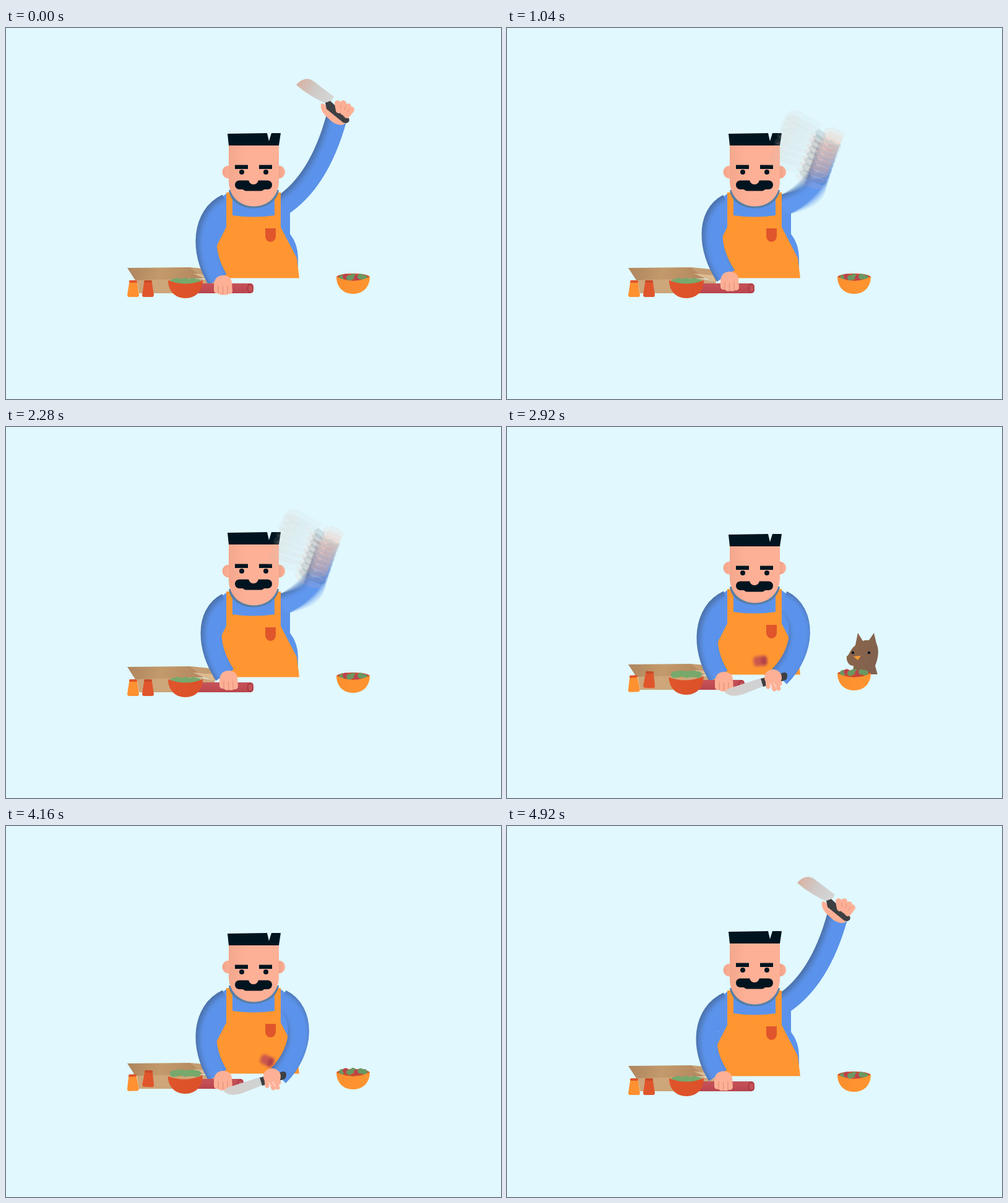
These frames come from a looping animation (800x600 px, 4960 ms). An HTML page with a canvas:

```html
<!DOCTYPE html>
<html lang="en">
<head>
<meta charset="utf-8">
<title>Busy cook</title>
<style>
html, body { margin: 0; width: 100%; height: 100%; overflow: hidden; background: #e0f8fe; }
canvas { display: block; width: 800px; height: 600px; }
</style>
</head>
<body>
<canvas id="stage" width="800" height="600"></canvas>
<script>
const LOOP = 4960, CHOP = 1240, STEP = 40, HIT = 360;
const INK = '#00141f', SKIN = '#fdb096', SKIN_DARK = '#df927a', BLUE = '#5b93ec', NAVY = '#4b70a8';
const ORANGE = '#ff9631', RED = '#e0552b', GREEN = '#77a96c', MEAT = '#c14c54';

const makeCanvas = () => Object.assign(document.createElement('canvas'), { width: 800, height: 600 });
const stage = document.getElementById('stage').getContext('2d');
const sample = makeCanvas().getContext('2d');
const blend = makeCanvas().getContext('2d');
let c = stage;

const clamp = x => Math.min(1, Math.max(0, x));
const lerp = (a, b, k) => a + (b - a) * k;
const ease = x => x * x * (3 - 2 * x);
const span = (t, a, b) => clamp((t - a) / (b - a));
const hop = (p, start, length, height) => {
  const k = span(p, start, start + length);
  return -4 * height * k * (1 - k);
};
function keyed(t, ...keys) {
  for (let i = 1; i < keys.length; i++) {
    const [a, va] = keys[i - 1], [b, vb] = keys[i];
    if (t <= b) return lerp(va, vb, span(t, a, b));
  }
  return keys[keys.length - 1][1];
}

function fill(color, path) {
  c.fillStyle = color;
  c.fill(typeof path === 'string' ? new Path2D(path) : path);
}
function oval(color, x, y, rx, ry = rx, turn = 0) {
  c.fillStyle = color;
  c.beginPath();
  c.ellipse(x, y, rx, ry, turn, 0, 7);
  c.fill();
}
function line(color, width, path, cap = 'round') {
  c.strokeStyle = color;
  c.lineWidth = width;
  c.lineCap = cap;
  c.stroke(new Path2D(path));
}
function block(color, x, y, w, h, r = 0) {
  c.fillStyle = color;
  c.beginPath();
  c.roundRect(x, y, w, h, r);
  c.fill();
}
function fade(x0, y0, x1, y1, ...colors) {
  const g = c.createLinearGradient(x0, y0, x1, y1);
  colors.forEach((color, i) => g.addColorStop(i / (colors.length - 1), color));
  return g;
}
function moved(dx, dy, draw) {
  c.save();
  c.translate(dx, dy);
  draw();
  c.restore();
}
function turned(x, y, px, py, angle, draw) {
  c.save();
  c.translate(x, y);
  c.rotate(angle);
  c.translate(-px, -py);
  draw();
  c.restore();
}
function clear(ctx) {
  ctx.setTransform(1, 0, 0, 1, 0, 0);
  ctx.clearRect(0, 0, 800, 600);
}

// Draws on a separate layer, averaging several poses when there is motion.
function layered(poses, dy, draw) {
  clear(blend);
  blend.globalCompositeOperation = 'lighter';
  blend.globalAlpha = 1 / poses.length;
  for (const pose of poses) {
    clear(sample);
    c = sample;
    draw(pose);
    blend.drawImage(sample.canvas, 0, 0);
  }
  c = stage;
  c.drawImage(blend.canvas, 0, dy);
}

// 1 with the knife held high, 0 with the blade on the board
function raise(p) {
  p = (p + CHOP) % CHOP;
  if (p < HIT) return 1 - span(p, 100, HIT) ** 2;
  return ease(span(p, 900, 1110));
}

function arm(path, light) {
  line(NAVY, 34, path, 'butt');
  c.save();
  c.globalCompositeOperation = 'source-atop';
  c.filter = 'blur(4px)';
  c.translate(light, 4);
  line(BLUE, 34, path);
  c.restore();
}
function rightArm(u) {
  const x = (a, b) => lerp(a, b, u);
  arm(`M445 ${x(285, 288)}C${x(482, 485)} ${x(303, 262)} ${x(484, 515)} ${x(364, 215)} ${x(440, 534)} ${x(408, 146)}`, 1 + 4 * u);
}

function raisedHand() {
  fill(SKIN, 'M509 123Q512 120 518 127L532 137 550 147Q550 157 541 157 530 156 522 147 507 135 509 123Z');
  fill(fade(470, 88, 526, 118, '#d9b0a0', '#cfcac8', '#d4d6d6'),
    'M469 92Q476 83 487 82 493 83 497 86L530 111 522 124 Q492 112 469 92Z');
  fill('#3d3f42', 'M516 121L524 118 554 146Q557 151 550 154L545 153 518 131Z');
  line(SKIN, 10, 'M536 122L538 133M545 122L545 136M553 127L549 139M558 132L551 141');
  line(SKIN_DARK, 1, 'M541 124L541 131M549 126L547 133M555 131L552 136');
}
function loweredHand() {
  fill(fade(357, 428, 414, 410, '#d5cfcc', '#cfd3d4'),
    'M358 423L411 406 415 419 382 432Q366 437 358 433 352 430 352 428Z');
  fill('#3d3f42', 'M410 407L448 397Q453 397 453 402 453 409 448 410L414 420Z');
  oval(SKIN, 430, 405, 14, 13);
  line(SKIN, 7, 'M421 409L422 420M427 411L432 424M434 410L439 423M438 408L441 415');
  line('#ffe0d5', 1.2, 'M425 415L428 421M431 414L435 421');
}
function rightHand(u) {
  const swing = 48 * Math.PI / 180, high = u > .5;
  turned(lerp(432, 540, u), lerp(412, 135, u), high ? 540 : 432, high ? 135 : 408,
    high ? (u - 1) * swing : u * swing, high ? raisedHand : loweredHand);
}

function leftHand(x, y) {
  moved(x - 351, y - 416, () => {
    fill(SKIN, 'M336 417Q336 401 350 400 364 400 365 412L366 426Q365 431 360 430 356 433 351 431 346 433 343 429 336 430 336 424Z');
    line(SKIN_DARK, 1.2, 'M343 417V429M350.5 418V431M358 417V430');
  });
}

function carton() {
  fill('#cda67a', 'M211 406H318L337 411V429H215Z');
  fill(fade(200, 388, 300, 408, '#b0875f', '#c39a6b', '#b68b62'), 'M196 388L298 387 321 405 209 408Z');
  fill('#c59d72', 'M298 387L338 391V412L318 404Z');
  fill('#dcbb91', 'M302 397L334 400 337 411 318 404Z');
}
function cup(x, color, top, dy, tilt) {
  turned(x, 435 + dy, 0, 0, tilt, () => {
    fill(color, 'M-6 -26H6L9.5 -3Q9 0 7 0H-7Q-9 0 -9.5 -3Z');
    block(top, -6.5, -27, 13, 4, 2);
  });
}
function leftBowl(p) {
  for (let i = 0; i < 7; i++) {
    const dy = hop(p, 370 + i % 3 * 10, 240 + i % 2 * 90, 8 + i % 3 * 2);
    if (i % 3 == 1) oval('#f29a43', 274 + i * 6, 411 + dy * .8, 4);
    oval(GREEN, 271 + i * 6.3, 411 - (i % 2) * 1.5 + dy, 6, 5.5);
  }
  turned(290, 422, 290, 422, hop(p, 380, 240, .04), () =>
    fill(fade(262, 410, 318, 436, RED, '#db5029'), 'M262 408Q290 419 318 408C318 426 306 437 290 437S262 426 262 408Z'));
}
function rightBowl(p) {
  oval('#cc4a2c', 561, 403, 27, 6);
  for (let i = 0; i < 7; i++) {
    const dy = hop(p, 380, 220 + i % 3 * 50, 3);
    oval(i % 3 == 1 ? '#bd4249' : '#6b9762', 543 + i * 6, 404 - (i % 2) * 2 + dy, 5, 4.5);
  }
  fill(fade(534, 405, 588, 430, '#fb8e2e', ORANGE), 'M534 402Q561 416 588 402C588 419 577 430 561 430S534 419 534 402Z');
}
function salami(end) {
  block(fade(0, 413, 0, 429, '#c4535a', MEAT, '#b7444e'), 306, 413, end - 306, 16, 5);
  oval('#ad3944', end - 5.5, 421, 5, 7.5);
  oval('#c25357', end - 5, 421, 3.5, 5.5);
}
function slice(p, cycle) {
  const far = cycle != 2;
  const k = span(p, 400, far ? 625 : 800);
  if (p < 400 || k >= 1) return;
  c.save();
  c.filter = 'blur(2px)';
  c.globalAlpha = .85;
  turned(lerp(392, far ? 561 : 566, k), lerp(412, far ? 400 : 376, k) - (far ? 45 : 72) * 4 * k * (1 - k), 0, 0, -.8 + k * 7, () => {
    block(MEAT, -11, -8, 22, 16, 5);
    oval('#a83b45', 6, 0, 4, 7);
  });
  c.restore();
}

function bird(t) {
  const up = ease(span(t, 2560, 2760)) - ease(span(t, 3380, 3560));
  if (up <= 0) return;
  c.save();
  c.beginPath();
  c.rect(520, 300, 100, 104);
  c.clip();
  c.translate(0, 4 + 72 * (1 - up));
  fill(fade(548, 360, 602, 380, '#8b6549', '#80614f'),
    'M563 353L567 333 575 346Q580 344 585 345L593 333 597 350C602 360 600 374 595 386L599 401H559L560 386C553 387 548 379 549 371 553 369 555 359 563 353Z');
  oval(INK, 559, 365, 2.2);
  oval(INK, 585, 365, 2.2);
  fill('#f59a35', 'M560 371L572 370 567 377Z');
  c.restore();
}

function torso() {
  fill(BLUE, 'M356 268Q342 277 341 290V333Q333 344 332 362L400 404H472V372Q472 350 459 333V290Q458 277 444 268Z');
  fill(ORANGE, 'M356 322V300L366 303Q400 308 434 303L444 300V322L470 372 474 404.5H352L334 365Z');
  fill(RED, 'M419 324H436V337A8.5 9 0 0 1 419 337Z');
}
function straps() {
  block(ORANGE, 356, 266, 10, 57);
  block(ORANGE, 434, 266, 10, 57);
}
function head(nod) {
  const drop = 7 * nod;
  fill('#557fa8', 'M360 262C362 281 380 291.5 400 291.5S438 281 441 262Z');
  oval(fade(349, 0, 362, 0, '#f3a38a', SKIN), 360, 233 - nod, 10.5);
  oval(fade(438, 0, 451, 0, '#eb9d84', SKIN), 440.5, 233 - nod, 10.5);
  fill(fade(360, 0, 441, 0, '#f3a78d', SKIN, SKIN, SKIN),
    `M360 ${186 + drop}H441V249C440 274 422 288.5 400.5 288.5S361 274 360 249Z`);
  moved(0, drop, () => {
    fill(INK, 'M358 171L422 170 425 183 429 170H444L441 190H360Z');
    block(INK, 370, 221.5, 21, 6.5);
    block(INK, 409, 221.5, 21, 6.5);
    oval(INK, 381, 233, 4);
    oval(INK, 420, 233, 4);
    block(INK, 370, 246.5, 60, 14.5, 7.2);
    block(INK, 382, 252, 36, 11.5, 6);
    oval(SKIN, 400, 245, 8);
  });
}

function render(time) {
  const t = Math.floor(time % LOOP / STEP) * STEP;
  const p = t % CHOP, cycle = Math.floor(t / CHOP);
  const shake = keyed(p, [0, 0], [320, 0], [360, 3.5], [400, 0], [440, -4], [520, 1], [600, -.5], [680, 0]);
  const nod = keyed(p, [0, 0], [240, 0], [320, .15], [400, .8], [440, 1], [640, .6], [880, .5], [1000, 0]);
  const push = ease(span(p, 620, 860));
  const handX = p < 900 ? lerp(351, 361, push) : keyed(p, [900, 361], [1040, 360], [1120, 350], [1160, 349], [CHOP, 351]);
  const handY = keyed(p, [0, 416], [960, 416], [1040, 410], [1120, 404], [1160, 407], [1200, 412.5], [CHOP, 416]);
  const slide = handX - 351;
  const still = Math.abs(raise(p - 18) - raise(p + 18)) < .005 || p >= 400 && p < 880;
  const poses = still ? [raise(p)] : Array.from({ length: 8 }, (_, i) => raise(p - 17.5 + i * 5));

  c = stage;
  c.setTransform(1, 0, 0, 1, 0, 0);
  c.fillStyle = '#e0f8fe';
  c.fillRect(0, 0, 800, 600);
  c.translate(0, shake);

  carton();
  cup(205.5, '#ff9130', RED, hop(p, 380, 200, 3), hop(p, 380, 200, .05));
  cup(229.5, RED, '#c94a28', hop(p, 380, 240, 12), -hop(p, 380, 240, .06));
  bird(t);
  rightBowl(p);
  torso();
  layered([0], 0, () => arm(
    `M357 285C${318 + slide * .5} 303 ${313 + slide * 1.3} ${360 + (handY - 416) * .6} ${handX - 9 + slide * .3} ${handY - 9}`, 5));
  layered(poses, 0, rightArm);
  straps();
  head(nod);
  salami(p < HIT ? 400 : lerp(384, 400, push));
  leftBowl(p);
  leftHand(handX, handY);
  slice(p, cycle);
  layered(poses, 0, rightHand);
}

const start = performance.now();
(function tick() {
  render(performance.now() - start);
  requestAnimationFrame(tick);
})();
</script>
</body>
</html>
```
